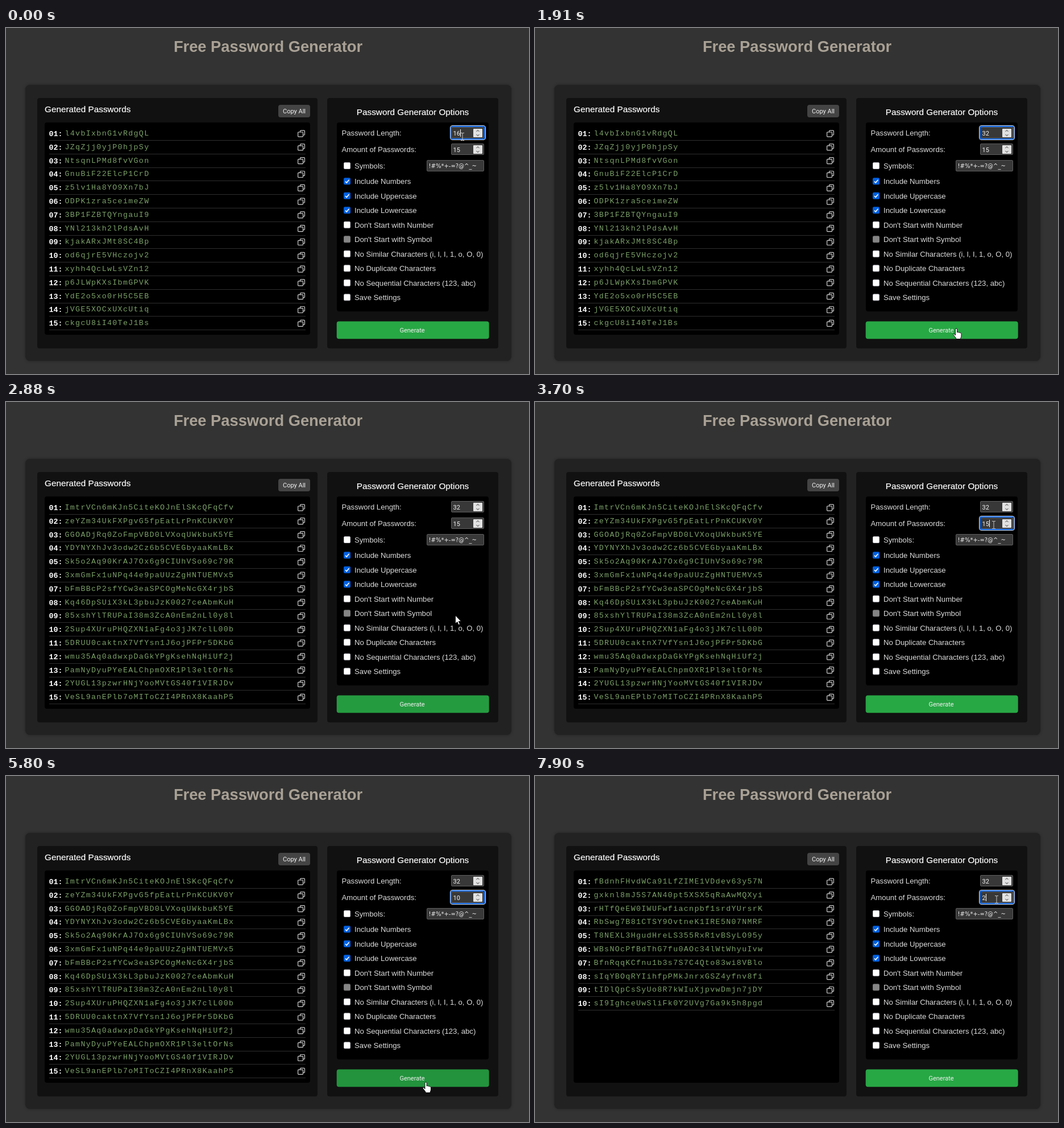
Recreate the animation shown at these times as an HTML page. Size 920 by 608 pixels, loop 8000 ms.

```html
<!DOCTYPE html>
<html lang="en">
<head>
<meta charset="utf-8">
<title>Free Password Generator</title>
<style>
html, body { margin: 0; width: 100%; height: 100%; overflow: hidden; background: #333; }
svg { display: block; width: 920px; height: 608px; }
text { font-family: "Liberation Sans", Arial, sans-serif; font-size: 13.15px; fill: #dcdcdc; white-space: pre; }
.title { font-size: 27.3px; font-weight: 700; fill: #a9a195; }
.head { font-size: 15.3px; fill: #fff; stroke: #fff; stroke-width: .2; }
.ui { font-family: Roboto, "Open Sans", sans-serif; font-size: 11px; fill: #f2f2f2; }
.sym { font-family: "DejaVu Sans", sans-serif; font-size: 10px; fill: #eee; }
.mono { font-family: "Liberation Mono", monospace; font-size: 13.3px; }
.num { font-weight: 700; fill: #fff; }
.pw { letter-spacing: .1em; fill: #7ba068; }
.mid { text-anchor: middle; }
.card { filter: drop-shadow(0 0 2.5px rgba(0, 0, 0, .35)); }
.icon { fill: none; stroke: #d0d0d0; stroke-width: 1.2; }
.field { fill: #383838; stroke: #5e5e5e; }
.ring { fill: none; stroke: #0f62dc; stroke-width: 2; }
.edge { fill: none; stroke: #cfdcf0; }
</style>
</head>
<body>
<svg id="stage" viewBox="0 0 920 608" xmlns="http://www.w3.org/2000/svg"></svg>
<script>
const LOOP = 8000;
const stage = document.getElementById('stage');

function add(parent, tag, attrs = {}, text) {
  const el = document.createElementNS('http://www.w3.org/2000/svg', tag);
  for (const k in attrs) el.setAttribute(k, attrs[k]);
  if (text !== undefined) el.textContent = text;
  parent.append(el);
  return el;
}
const box = (x, y, width, height, fill, rx = 0, parent = stage) =>
  add(parent, 'rect', { x, y, width, height, fill, rx });
const label = (x, y, cls, text, parent = stage) =>
  add(parent, 'text', { x, y, class: cls }, text);
const show = (el, on) => { el.style.display = on ? '' : 'none'; };

// Page
box(0, 0, 920, 608, '#333');
label(461, 42, 'title mid', 'Free Password Generator');
box(34, 100, 855, 485, '#222', 8).setAttribute('class', 'card');
box(55, 123, 493, 440, '#111', 4);
box(565, 123, 301, 440, '#111', 4);
box(68, 166, 467, 373, '#000', 4);
box(582, 166, 267, 332, '#000', 4);
label(68, 148, 'head', 'Generated Passwords');
label(715.5, 152.5, 'head mid', 'Password Generator Options');
box(479, 135, 56, 22, '#444', 4);
label(507, 150, 'ui mid', 'Copy All');

// Password lists
function randomList(rows, size, seed) {
  const abc = 'ABCDEFGHIJKLMNOPQRSTUVWXYZabcdefghijklmnopqrstuvwxyz0123456789';
  const pick = () => {
    seed = (seed * 1664525 + 1013904223) % 4294967296;
    return abc[Math.floor(seed / 4294967296 * abc.length)];
  };
  return Array.from({ length: rows }, () => Array.from({ length: size }, pick).join(''));
}
const words = s => s.trim().split(/\s+/);
const lists = [
  words(`l4vbIxbnG1vRdgQL JZqZjj0yjP0hjpSy NtsqnLPMd8fvVGon GnuBiF22ElcP1CrD
    z5lv1Ha8YO9Xn7bJ ODPK1zra5ceimeZW 3BP1FZBTQYngauI9 YNl213kh2lPdsAvH
    kjakARxJMt8SC4Bp od6qjrE5VHczojv2 xyhh4QcLwLsVZn12 p6JLWpKXsIbmGPVK
    YdE2o5xo0rH5C5EB jVGE5XOCxUXcUtiq ckgcU8iI40TeJ1Bs`),
  randomList(15, 32, 7),
  words(`ImtrVCn6mKJn5CiteKOJnElSKcQFqCfv zeYZm34UkFXPgvG5fpEatLrPnKCUKV0Y
    GGOADjRq0ZoFmpVBD0LVXoqUWkbuK5YE YDYNYXhJv3odw2Cz6b5CVEGbyaaKmLBx
    Sk5o2Aq90KrAJ7Ox6g9CIUhVSo69c79R 3xmGmFx1uNPq44e9paUUzZgHNTUEMVx5
    bFmBBcP2sfYCw3eaSPCOgMeNcGX4rjbS Kq46DpSUiX3kL3pbuJzK0027ceAbmKuH
    85xshYlTRUPaI38m3ZcA0nEm2nLl0y8l 2Sup4XUruPHQZXN1aFg4o3jJK7clL00b
    5DRUU0caktnX7VfYsn1J6ojPFPr5DKbG wmu35Aq0adwxpDaGkYPgKsehNqHiUf2j
    PamNyDyuPYeEALChpmOXR1Pl3eltOrNs 2YUGL13pzwrHNjYooMVtGS40f1VIRJDv
    VeSL9anEPlb7oMIToCZI4PRnX8KaahP5`),
  words(`fBdnhFHvdWCa91LfZIME1VDdev63y57N gxknl8mJ5S7AN40pt5XSX5qRaAwMQXyi
    rHTfQeEW0IWUFwfiacnpbf1srdYUrsrK RbSwg7B81CTSY9OvtneK1IRE5N07NMRF
    T8NEXL3HgudHreLS355RxR1vBSyLO95y WBsNOcPfBdThG7fu0AOc34lWtWhyuIvw
    BfnRqqKCfnu1b3s7S7C4Qto83wi8VBlo sIqYBOqRYIihfpPMkJnrxGSZ4yfnv8fi
    tIDlQpCsSyUo8R7kWIuXjpvwDmjn7jDY sI9IghceUwSliFk0Y2UVg7Ga9k5h8pgd`)
].map(list => {
  const g = add(stage, 'g');
  list.forEach((word, i) => {
    const y = 23.8 * i;
    label(75.5, 190 + y, 'mono num', String(i + 1).padStart(2, '0') + ':', g);
    label(103.5, 189 + y, 'mono pw', word, g);
    add(g, 'path', {
      class: 'icon',
      transform: `translate(513 ${179.5 + y})`,
      d: 'M4.5 3.5V1.6a1 1 0 0 1 1-1h5.9a1 1 0 0 1 1 1v5.9a1 1 0 0 1-1 1H9.5M1.6 3.5h6.9a1 1 0 0 1 1 1v6.1a1 1 0 0 1-1 1H1.6a1 1 0 0 1-1-1V4.5a1 1 0 0 1 1-1Z'
    });
    box(76, Math.round(197 + y), 451, 1, '#2e2e2e', 0, g);
  });
  return g;
});

// Number fields
function numberField(y, name) {
  label(590.5, y + 4.5, '', name);
  add(stage, 'rect', { class: 'field', x: 783.5, y: y - 9.5, width: 57, height: 19, rx: 1.5 });
  const ring = add(stage, 'g');
  add(ring, 'rect', { class: 'ring', x: 783, y: y - 11, width: 59, height: 22, rx: 2 });
  add(ring, 'rect', { class: 'edge', x: 781.5, y: y - 12.5, width: 62, height: 25, rx: 3.5 });
  box(822, y - 7, 16, 15, '#e2e2e2', 1);
  add(stage, 'path', {
    d: `M827.5 ${y - 2}l2.5-2.5 2.5 2.5M827.5 ${y + 3}l2.5 2.5 2.5-2.5`,
    fill: 'none', stroke: '#777', 'stroke-width': 1.1
  });
  const sel = box(787, y - 7, 12, 15, '#0078d7');
  const text = label(786.5, y + 4.5, 'ui', '');
  const caret = box(0, y - 6, 1, 13, '#fff');
  return (value, focus, mark) => {
    text.textContent = value;
    show(ring, focus);
    show(sel, focus && mark === 'sel');
    show(caret, focus && mark === 'caret');
    caret.setAttribute('x', 787 + 6 * value.length);
  };
}
const lenField = numberField(184, 'Password Length:');
const numField = numberField(213, 'Amount of Passwords:');
add(stage, 'rect', { class: 'field', x: 740.5, y: 232.5, width: 100, height: 19, rx: 1.5 });
label(743.5, 246, 'sym', '!#%*+-=?@^_~');

// Checkboxes
const checks = [
  'Symbols:', 'Include Numbers', 'Include Uppercase', 'Include Lowercase',
  "Don't Start with Number", "Don't Start with Symbol",
  'No Similar Characters (i, l, I, 1, o, O, 0)', 'No Duplicate Characters',
  'No Sequential Characters (123, abc)', 'Save Settings'
].map((name, i) => {
  const y = i ? 269.3 + 25.5 * (i - 1) : 242;
  const on = i > 0 && i < 4, off = i === 5;
  label(613, y + 4.7, '', name);
  const el = add(stage, 'rect', { x: 594.5, y: y - 5.5, width: 11, height: 11, rx: 1.5 });
  if (on) add(stage, 'path', {
    d: `M597 ${y + .3}l2.2 2.4 4.2-5.2`, fill: 'none', stroke: '#fff', 'stroke-width': 1.6
  });
  return hover => {
    const blue = hover ? '#0250bb' : '#0060df';
    el.setAttribute('fill', on ? blue : off ? '#858585' : '#fff');
    el.setAttribute('stroke', on ? blue : off ? '#777' : hover ? '#8f8f9d' : '#c4c4cb');
  };
});

// Generate button
const button = box(581.7, 515.5, 268, 30.7, '#28a745', 4);
label(714.5, 535, 'ui mid', 'Generate');
function mix(k) {
  const a = [40, 167, 69], b = [33, 136, 56];
  return `rgb(${a.map((v, i) => Math.round(v + (b[i] - v) * k))})`;
}

// Pointers
const shape = (d, attrs) => add(stage, 'path', { d, ...attrs });
const solid = { fill: '#fff', stroke: '#000', 'stroke-width': .9, 'stroke-linejoin': 'round' };
const pointers = {
  arrow: shape('M0 0V14.5L3.3 11.4 5.6 16.6 8 15.6 5.7 10.5H10.2Z', solid),
  hand: shape('M-1.6 12V1.6a1.6 1.6 0 0 1 3.2 0V7c.5-1 2.6-.8 2.8.4 .6-.8 2.4-.5 2.6.7 .8-.6 2 0 2 1.2V13c0 2-1.2 3-1.5 5.5H0C-.5 16-3 14-5 11.2c-1-1.6 1-2.6 2-1.4Z', solid),
  beam: shape('M-3-6.5H-1L0-6 1-6.5H3M0-6V6M-3 6.5H-1L0 6 1 6.5H3',
    { fill: 'none', stroke: '#c4c4c4', 'stroke-width': 1 })
};

// Each step changes only what it names
const steps = [
  { t: 0, len: '16', num: '15', focus: 'len', mark: 'caret', cur: 'beam', x: 803, y: 191, hover: -1, btn: 0, set: 0 },
  { t: 120, mark: 'sel' },
  { t: 1100, len: '3', mark: 'caret', cur: '' },
  { t: 1250, len: '32' },
  { t: 1400, mark: '', cur: 'beam', x: 802, y: 214 },
  { t: 1520, cur: 'arrow', x: 788, y: 300, hover: 2 },
  { t: 1640, x: 765, y: 453, hover: 8 },
  { t: 1790, x: 750, y: 503, hover: -1 },
  { t: 1910, cur: 'hand', x: 741, y: 528 },
  { t: 2030, x: 743, y: 534, btn: .6 },
  { t: 2150, focus: '', btn: 1 },
  { t: 2300, set: 1 },
  { t: 2730, set: 2, x: 741, y: 528 },
  { t: 2880, cur: 'arrow', x: 790.5, y: 375, btn: .4 },
  { t: 3000, x: 814, y: 273, hover: 2, btn: 0 },
  { t: 3150, cur: 'beam', x: 818, y: 240, hover: -1 },
  { t: 3280, x: 813, y: 216 },
  { t: 3430, x: 807 },
  { t: 3700, focus: 'num', mark: 'caret' },
  { t: 3850, mark: 'sel' },
  { t: 4940, num: '1', mark: 'caret' },
  { t: 5220, num: '10', x: 805, y: 240 },
  { t: 5370, cur: 'arrow', x: 797, y: 280, hover: 1 },
  { t: 5520, mark: '', x: 780, y: 395, hover: 6 },
  { t: 5650, x: 757, y: 505, hover: -1 },
  { t: 5800, cur: 'hand', x: 738.5, y: 538, btn: .65 },
  { t: 6070, focus: '', btn: 1 },
  { t: 6190, set: 3, cur: 'arrow', x: 775, y: 440, btn: .6 },
  { t: 6340, x: 800, y: 336.5, hover: 6, btn: .12 },
  { t: 6490, x: 808, y: 280, hover: 1, btn: 0 },
  { t: 6610, x: 809, y: 226, hover: 0 },
  { t: 6760, cur: 'beam', x: 815, y: 218, hover: -1 },
  { t: 6890, x: 812, y: 217 },
  { t: 7030, focus: 'num', mark: 'caret' },
  { t: 7160, mark: 'sel' },
  { t: 7900, num: '2', mark: 'caret' }
];
let last = {};
const states = steps.map(s => (last = { ...last, ...s }));

let shown;
function draw(s) {
  lists.forEach((g, i) => show(g, i === s.set));
  lenField(s.len, s.focus === 'len', s.mark);
  numField(s.num, s.focus === 'num', s.mark);
  checks.forEach((paint, i) => paint(i === s.hover));
  button.setAttribute('fill', mix(s.btn));
  for (const k in pointers) {
    show(pointers[k], k === s.cur);
    pointers[k].setAttribute('transform', `translate(${s.x} ${s.y})`);
  }
}

const start = performance.now();
function tick() {
  const t = (performance.now() - start) % LOOP;
  const s = states.findLast(v => v.t <= t) || states[0];
  if (s !== shown) draw(shown = s);
  requestAnimationFrame(tick);
}
tick();
</script>
</body>
</html>
```
